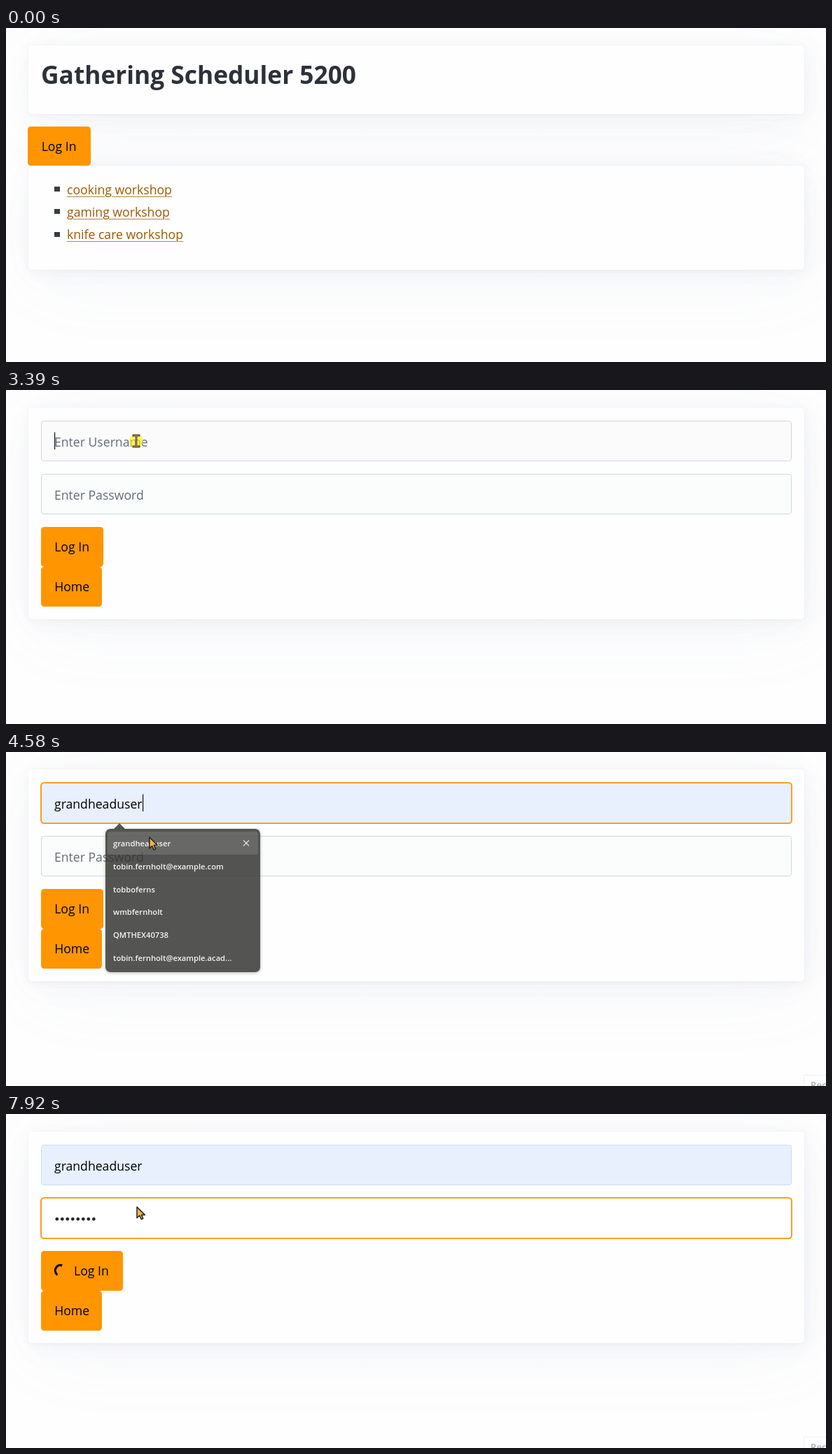
Animation, 1171 px wide and 478 px high, one loop 7.99 s. Source, as an HTML page with a canvas:

```html
<!DOCTYPE html>
<html lang="en">
<head>
<meta charset="utf-8">
<title>Workshop login</title>
<style>
  html, body { margin: 0; width: 100%; height: 100%; overflow: hidden; background: #fefefe; }
  body { position: relative; font: 17.64px/28px "Open Sans", "Noto Sans", sans-serif; color: #373c44; }
  body *, body { box-sizing: border-box; }
  [hidden] { display: none !important; }
  .page, canvas { position: absolute; left: 0; top: 0; width: 1171px; height: 478px; overflow: hidden; }
  .page > *, .menu > * { position: absolute; white-space: nowrap; }
  .card {
    left: 31.5px; width: 1108px; border-radius: 4.6px; background: #fefefe;
    box-shadow: .3px .5px 3.2px rgba(129,145,181,.017), .6px 1.2px 7.4px rgba(129,145,181,.024),
      1.2px 2.3px 13.9px rgba(129,145,181,.03), 2.1px 4.2px 25px rgba(129,145,181,.036),
      3.9px 7.7px 46px rgba(129,145,181,.043), 9.3px 18.5px 111px rgba(129,145,181,.06),
      0 0 0 1.2px rgba(129,145,181,.015);
  }
  h1 { left: 50px; top: 45px; margin: 0; font-size: 35.3px; line-height: 42px; font-weight: 700; color: #2d3138; }
  .button {
    height: 56.5px; padding-left: 19.2px; line-height: 56px;
    border-radius: 4.6px; background: #ff9500; color: #000;
  }
  .button.pressed { box-shadow: 0 0 0 2.3px rgba(255,149,0,.5); }
  #enter { left: 31px; top: 141px; width: 90px; height: 56px; padding-left: 19.7px; }
  ul { left: 87px; top: 216.5px; margin: 0; padding: 0; list-style: none; }
  li { position: relative; height: 32.3px; }
  li::before { content: ""; position: absolute; left: -18px; top: 10.5px; width: 8px; height: 7px; background: #373c44; }
  li span { color: #9c5900; text-decoration: underline 1px rgba(156,89,0,.75); text-underline-offset: 2.6px; }
  .field {
    left: 50px; width: 1071.5px; height: 58px; padding: 1px 0 0 18px; line-height: 56px;
    border: 1px solid #cfd5e2; border-radius: 4.6px; background: #fbfcfc; color: #646b79;
  }
  .field.filled { background: #e8f0fe; border-color: #cddaf0; color: #000; }
  .ring { left: 49px; width: 1073.5px; height: 60px; border: 2px solid #f99f25; border-radius: 5.5px; }
  .menu {
    left: 142px; top: 110px; width: 221px; height: 204.5px; border-radius: 7px;
    background: rgba(50,50,48,.83); box-shadow: 0 1px 4px rgba(0,0,0,.3);
    font-size: 11.2px; font-weight: 600; line-height: 18px; color: #f4f4f4;
  }
  .menu::before {
    content: ""; position: absolute; left: 12px; top: -8px; border: solid transparent;
    border-width: 0 8px 8px; border-bottom-color: rgba(50,50,48,.83);
  }
  .menu .hover { left: 3px; top: 4px; width: 215px; height: 32.5px; border-radius: 4px; background: rgba(255,255,255,.12); }
  .tab {
    left: 1139px; top: 462px; width: 60px; height: 40px; padding: 4px 0 0 9px; line-height: 18px;
    border: 1px solid #eef0f3; background: #fff; font-size: 12.8px; font-weight: 700; color: #b4bac3;
  }
</style>
</head>
<body>
<div class="page" id="home">
  <div class="card" style="top:25px;height:97.5px"></div>
  <div class="card" style="top:197px;height:148.5px"></div>
  <h1>Gathering Scheduler 5200</h1>
  <div class="button" id="enter">Log In</div>
  <ul>
    <li><span>cooking workshop</span></li>
    <li><span>gaming workshop</span></li>
    <li><span>knife care workshop</span></li>
  </ul>
</div>
<div class="page" id="login" hidden>
  <div class="card" style="top:25px;height:303px"></div>
  <div class="field" id="user" style="top:43.5px"><span></span></div>
  <div class="field" id="pass" style="top:120px"><span></span></div>
  <div class="ring" id="userRing" style="top:42.5px"></div>
  <div class="ring" id="passRing" style="top:119px"></div>
  <div class="button" id="submit" style="left:50px;top:196px">Log In</div>
  <div class="button" style="left:50px;top:253px;width:87px">Home</div>
  <div class="menu" id="menu"><div class="hover" id="hover"></div></div>
  <div class="tab" id="tab">Rec</div>
</div>
<canvas id="overlay"></canvas>
<script>
const LOOP = 7990;
const USER = "grandheaduser";
const SUGGESTIONS = [USER, "tobin.fernholt@example.com", "tobboferns", "wmbfernholt",
  "QMTHEX40738", "tobin.fernholt@example.acad..."];
const KEYSTROKES = [5370, 6000, 6240, 6370, 6520, 7050, 7120, 7320];
const T = { press: 1910, login: 2300, focus: 3390, open: 3520, preview: 4200, close: 4650, next: 4780, submit: 7850 };

// time, x, y of the pointer's hot spot
const PATH = [
  [70, 909, 474], [280, 905, 472], [430, 827, 445], [650, 640, 379], [850, 450, 311], [1020, 321, 264],
  [1200, 195, 211], [1330, 125, 181], [1450, 101, 172], [1700, 101, 172], [1840, 99, 179.5],
  [2300, 99, 179.5], [2500, 118, 164], [2800, 168, 115], [3060, 186, 82], [3190, 186, 73],
  [3860, 186, 73], [4050, 198, 98], [4250, 207, 118], [4440, 207, 120], [4580, 205, 122], [4720, 188, 133], [5900, 187, 133]
];

const ARROW = new Path2D("M0 0V15.8L3.7 12.4L6.2 17.8L8.8 16.6L6.4 11.4H11.3Z");
const HAND = new Path2D("M-1.6 1Q0-1.2 1.6 1V7L4 7.2L6.6 8L9 9Q10 9.5 9.8 12Q9.5 15 8 18.5H0Q-2.4 15-5 11Q-4.5 8.6-1.6 11Z");
const KNUCKLES = new Path2D("M1.6 7V10.5M4.1 7.4V10.8M6.7 8.2V11.2");
const BEAM = new Path2D("M-4-8H4M-4 8H4M0-8V8");
const CROSS = new Path2D("M339 126.3L347 134.3M347 126.3L339 134.3");

const $ = id => document.getElementById(id);
const clamp = v => Math.max(0, Math.min(1, v));
const show = (id, on) => { $(id).hidden = !on; };
const within = (p, x, y, w, h) => p.x >= x && p.x <= x + w && p.y >= y && p.y <= y + h;

SUGGESTIONS.forEach((text, i) => {
  const row = document.createElement("div");
  row.textContent = text;
  row.style.cssText = `left:11px;top:${12 + i * 32.8}px`;
  $("menu").append(row);
});

const canvas = $("overlay"), ctx = canvas.getContext("2d");
const scale = window.devicePixelRatio || 1;
canvas.width = 1171 * scale;
canvas.height = 478 * scale;

function stroke(path, color, width) {
  ctx.strokeStyle = color;
  ctx.lineWidth = width;
  ctx.stroke(path);
}

function fillDot(x, y, r, color) {
  ctx.fillStyle = color;
  ctx.beginPath();
  ctx.arc(x, y, r, 0, 2 * Math.PI);
  ctx.fill();
}

function pointerAt(t) {
  const i = PATH.findIndex(k => k[0] > t);
  const b = i < 0 ? PATH[PATH.length - 1] : PATH[i];
  const a = i < 0 ? b : PATH[Math.max(0, i - 1)];
  const u = a === b ? 0 : (t - a[0]) / (b[0] - a[0]);
  return { x: a[1] + (b[1] - a[1]) * u, y: a[2] + (b[2] - a[2]) * u };
}

function pointerKind(t, p) {
  if (t < T.login) {
    const onLink = [150, 147, 164].some((w, i) => within(p, 87, 219 + i * 32.3, w, 24));
    return onLink || within(p, 31, 141, 90, 56) ? "hand" : "arrow";
  }
  if (t >= T.submit) return "arrow";
  if (t >= T.open && t < T.close && within(p, 142, 110, 221, 204)) return "arrow";
  return within(p, 50, 43.5, 1071, 58) || within(p, 50, 120, 1071, 58) ? "beam" : "arrow";
}

function drawPointer(t) {
  const p = pointerAt(t), kind = pointerKind(t, p);
  ctx.save();
  ctx.translate(p.x, p.y);
  const clicking = [T.press, T.focus].some(c => t >= c && t < c + 160);
  if (clicking) fillDot(0, 0, 10, "rgba(250,238,20,.65)");
  ctx.lineJoin = "round";
  if (kind === "beam") {
    ctx.lineCap = "square";
    stroke(BEAM, "#4b4337", 2.8);
    ctx.lineCap = "butt";
    stroke(BEAM, "#b98a3c", 1.2);
  } else if (kind === "hand") {
    ctx.fillStyle = "#ffc65a";
    ctx.fill(HAND);
    stroke(HAND, "#262420", 1.5);
    stroke(KNUCKLES, "#262420", 1);
  } else {
    ctx.fillStyle = "#f2b445";
    ctx.fill(ARROW);
    stroke(ARROW, "#262420", 1.5);
  }
  ctx.restore();
}

function drawCaret(x, y) {
  ctx.fillStyle = "#111";
  ctx.fillRect(Math.round(x), y, 1.2, 24.5);
}

function drawSpinner(t) {
  const since = t - T.submit - 70, rad = Math.PI / 180;
  const arc = new Path2D();
  arc.arc(77.8, 224, 7.6, (125 + since * .18) * rad, (288 + since * .5) * rad);
  stroke(arc, "#000", 3);
}

function setField(id, text, filled) {
  const field = $(id);
  field.firstElementChild.textContent = text;
  field.classList.toggle("filled", filled);
}

function drawLogin(t) {
  const preview = t >= T.preview, typed = KEYSTROKES.filter(k => t >= k).length;
  const menuOpen = t >= T.open && t < T.close, loading = t >= T.submit;
  const swap = clamp((t - T.next) / 190);
  setField("user", preview ? USER : "Enter Username", preview);
  setField("pass", typed ? "" : "Enter Password", false);
  $("user").style.backgroundColor = t >= T.focus && !preview ? "#fbfbfb" : "";
  $("pass").style.backgroundColor = swap > .5 ? "#fff" : "";
  $("userRing").style.opacity = clamp((t - T.focus) / 190) * (1 - swap);
  $("passRing").style.opacity = swap;
  show("menu", menuOpen);
  show("hover", preview);
  show("tab", t >= 3450);
  $("submit").style.width = loading ? "117px" : "89px";
  $("submit").style.paddingLeft = loading ? "47px" : "";

  for (let i = 0; i < typed; i++) fillDot(72.8 + 7.5 * i, 150.3, 2.35, "#23262c");
  if (t >= T.focus && t < 3920) drawCaret(69, 60.5);
  if (preview && t < 4720) drawCaret(69 + $("user").firstElementChild.offsetWidth, 60.5);
  if (t >= T.next && !loading) {
    const last = typed ? KEYSTROKES[typed - 1] : T.next;
    if (t - last < 520) drawCaret(69 + 7.5 * typed, 136.5);
  }
  if (menuOpen && preview) stroke(CROSS, "#eee", 1.2);
  if (loading) drawSpinner(t);
}

function render(t) {
  ctx.setTransform(scale, 0, 0, scale, 0, 0);
  ctx.clearRect(0, 0, 1171, 478);
  const onLogin = t >= T.login;
  show("home", !onLogin);
  show("login", onLogin);
  $("enter").classList.toggle("pressed", t >= T.press);
  if (onLogin) drawLogin(t);
  if (t >= 70) drawPointer(t);
}

const start = performance.now();
function tick() {
  render((performance.now() - start) % LOOP);
  requestAnimationFrame(tick);
}
tick();
</script>
</body>
</html>
```
